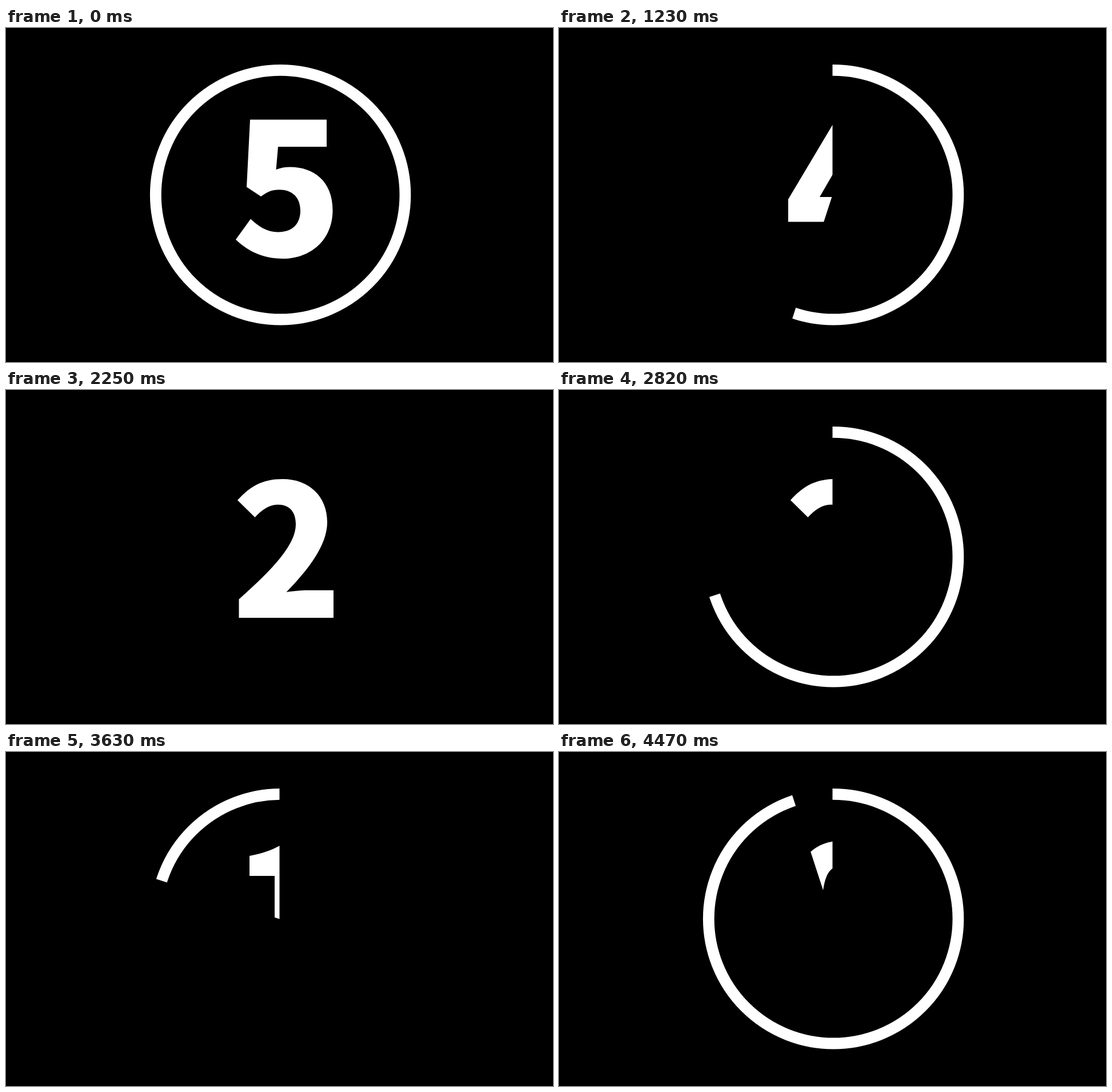
Animation, 957 px wide and 585 px high, one loop 4500 ms. Source, as an HTML page with a canvas:

```html
<!DOCTYPE html>
<html lang="en">
<head>
<meta charset="utf-8">
<title>Countdown</title>
<style>
  html, body { margin: 0; width: 100%; height: 100%; overflow: hidden; background: #000; }
  canvas { display: block; }
</style>
</head>
<body>
<canvas id="stage" width="957" height="585"></canvas>
<script>
const ctx = document.getElementById('stage').getContext('2d');
const COUNT = 750, HOLD = 180, STEP = 30, STEPS = 20;
const PIVOT = { x: 478.5, y: 292.5 };

const digits = [
  // 5
  'M427 160.5H561V208H476L472.5 248C481 244.7 488 243.5 497 243.5C538 243.5 571.5 268 571.5 319' +
  'C571.5 373 531 404 485 404C446 404 420 388 402 370.5L428 334.5C441 347 456.5 357.5 476 357.5' +
  'C500 357.5 515 344 515 320C515 296 500 283.3 478 283.3C465 283.3 457.5 287 446 295L421 278.5Z',
  // 4
  'M484 160.5H554V296H581V339.5H554V399H501V339.5H401V300Z' +
  'M456 296L484 247.5C490 236 495.5 222.5 501.7 208.5H503.3C502.4 224 501 243 501 257V296Z',
  // 3
  'M483 404C529 404 571.5 379 571.5 333.5C571.5 302 551 282.5 525.5 275.5V274C549.5 263.5 564 246 564 220.5' +
  'C564 179 531.5 156 483.5 156C455 156 430 167.5 408 185.5L437 220.5C450.5 208.5 463 200.8 478 200.8' +
  'C496 200.8 507 209.5 507 226C507 245.5 492 257.5 453 257.5V297.5C502 297.5 514.5 309 514.5 329.5' +
  'C514.5 348 499.5 357.5 476 357.5C456 357.5 441 347 428 334L402 370C418 390.5 446 404 483 404Z',
  // 2
  'M407.5 399V366.5C470 311 507 270 507 235C507 213 495.5 200.8 475.5 200.8C460 200.8 447 210.5 435.5 223' +
  'L405 193C427 169 448 156 484 156C530.5 156 562 186.5 562 231.5C562 271.5 529.5 314 490.5 354' +
  'C502 352.3 517 350.8 528 350.8H573V399Z',
  // 1
  'M420 399V352.6H470V217H426V182C452 177 470 170 485 160.5H526V352.6H570V399Z',
  // 0
  'M491 156C442 156 405.5 196 405.5 280S442 404 491 404S576.5 364 576.5 280S540 156 491 156Z' +
  'M491 200C472 200 460 219.5 460 280S472 360 491 360S522 340.5 522 280S510 200 491 200Z'
].map(d => new Path2D(d));

const ring = new Path2D();
ring.arc(480.1, 292.2, 218.3, 0, Math.PI * 2);

function drawRing() {
  ctx.lineWidth = 19.8;
  ctx.stroke(ring);
}

// Draws inside a clockwise sector, measured in steps from twelve o'clock.
function inSector(from, to, draw) {
  const angle = n => n / STEPS * Math.PI * 2 - Math.PI / 2;
  ctx.save();
  ctx.beginPath();
  ctx.moveTo(PIVOT.x, PIVOT.y);
  ctx.arc(PIVOT.x, PIVOT.y, 600, angle(from), angle(to));
  ctx.closePath();
  ctx.clip();
  draw();
  ctx.restore();
}

function render(time) {
  const t = time % (COUNT * digits.length);
  const index = Math.floor(t / COUNT);
  const step = Math.max(0, Math.floor((t % COUNT - HOLD) / STEP) + 1);
  const erasing = index % 2 === 0;
  const drawDigit = () => ctx.fill(digits[index], 'evenodd');

  ctx.fillStyle = '#000';
  ctx.fillRect(0, 0, 957, 585);
  ctx.fillStyle = ctx.strokeStyle = '#fff';

  if (step === 0) {
    drawDigit();
    if (erasing) drawRing();
    return;
  }
  inSector(step, STEPS, drawDigit);
  if (erasing) inSector(step, STEPS, drawRing);
  else inSector(0, step, drawRing);
}

const start = performance.now();
function tick() {
  render(performance.now() - start);
  requestAnimationFrame(tick);
}
tick();
</script>
</body>
</html>
```
